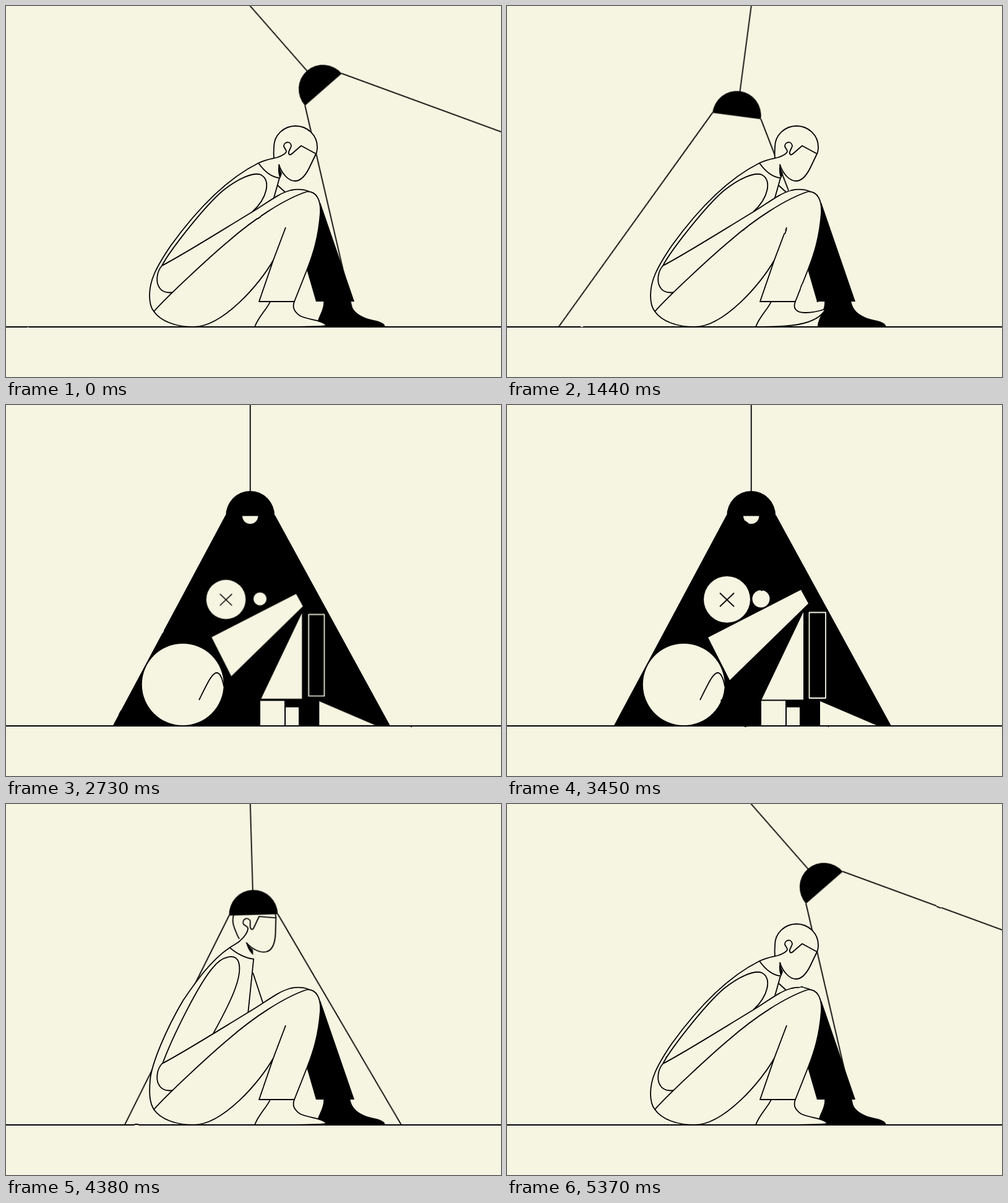
An HTML page that plays this animation: 800x600 px, repeating every 5.4 s.

```html
<!DOCTYPE html>
<html lang="en">
<head>
<meta charset="utf-8">
<title>Under the lamp</title>
<style>
  :root { --paper: #f6f5e2; --ink: #000; --loop: 5400ms; --ease: cubic-bezier(.65, 0, .35, 1); }
  html, body { margin: 0; width: 100%; height: 100%; overflow: hidden; background: var(--paper); }
  svg { display: block; width: 100vw; height: 100vh; }

  .line { fill: none; }
  .skin { fill: var(--paper); }
  .ink { fill: var(--ink); stroke: none; }
  .bare { stroke: none; }
  .outlined { fill: var(--ink); stroke: var(--paper); }

  .swing, .pose, .head, .toe { animation: var(--loop) var(--ease) infinite; }
  .swing { transform-origin: 395px 0; animation-name: swing; }
  .pose { animation-name: pose; }
  .head { transform-origin: 477px 226px; animation-name: head; }
  .toe { animation-name: toe; }
  .dark { animation: dark var(--loop) linear infinite; }
  .bulb { animation: bulb var(--loop) step-end infinite; }
  .piece {
    transform-box: fill-box;
    transform-origin: center;
    animation: pop var(--loop) var(--ease) calc(var(--i) * 20ms) infinite backwards;
  }

  @keyframes swing {
    0%, 1.1% { transform: rotate(-41.2deg); }
    29.63% { transform: rotate(8deg); }
    40.74%, 76.48% { transform: rotate(0deg); }
    100% { transform: rotate(-41.2deg); }
  }
  @keyframes pose {
    0%, 27.8% { d: var(--low); }
    40.74%, 75% { d: var(--high); }
    97.2%, 100% { d: var(--low); }
  }
  @keyframes head {
    0%, 27.8% { transform: translate(0px, 0px) rotate(0deg); }
    40.74%, 75% { transform: translate(-74.8px, -48.4px) rotate(-26.4deg); }
    97.2%, 100% { transform: translate(0px, 0px) rotate(0deg); }
  }
  @keyframes toe {
    0%, 17% { d: var(--low); }
    26%, 37% { d: var(--high); }
    46.3%, 100% { d: var(--low); }
  }
  @keyframes dark {
    0%, 39.26% { opacity: 0; }
    42.4%, 71.7% { opacity: 1; }
    74.1%, 100% { opacity: 0; }
  }
  @keyframes bulb {
    0% { opacity: 0; }
    39.26% { opacity: 1; }
    74.1%, 100% { opacity: 0; }
  }
  @keyframes pop {
    0%, 44% { transform: scale(0); }
    50%, 66.5% { transform: scale(1); }
    68.5%, 100% { transform: scale(0); }
  }

  .body {
    --low: path("M408,254 C358,279 310,327 266,388 C241,425 232,445 232,468 C232,480 234,488 239,494 L300,500 L433,340 L433,310 L442,278 C430,277 418,268 408,254 Z");
    --high: path("M357,230 C328,250 304,287 288,311 C260,359 236,417 233,444 C231,468 232,483 239,494 L300,500 L387,362 L387,341 L396,248 C384,247 367,239 357,230 Z");
  }
  .far-arm {
    --low: path("M439,290 L451,301 L433,318");
    --high: path("M395,271 L412,325 L387,348");
  }
  .neck {
    --low: path("M408,254 L433,246 L454,235 L446,270 L442,279 Z");
    --high: path("M357,230 L372,219 L386,197 L394,231 L396,248 Z");
  }
  .nape {
    --low: path("M408,254 C420,248 430,247 438,245 Q450,241 453,236");
    --high: path("M357,230 C366,224 370,222 372,219 Q385,207 385,197");
  }
  .upper-arm {
    --low: path("M252,420 C265,395 320,325 350,299 C375,279 400,268 412,273 C428,282 423,310 398,333");
    --high: path("M253,420 C270,373 311,287 333,261 C347,242 367,239 372,253 C380,278 354,327 327,378");
  }
  .foot {
    --low: path("M427,478 C422,490 408,502 402,519 C440,519 500,520 518,517 C512,508 490,508 475,501 C464,493 463,486 466,478");
    --high: path("M427,478 C422,490 408,502 402,519 C450,519 500,518 515,490 C500,495 490,496 482,496 C466,496 462,488 466,478");
  }
</style>
</head>
<body>
<svg viewBox="0 0 800 600" preserveAspectRatio="none">
  <defs>
    <clipPath id="above"><rect x="-10" y="-10" width="820" height="529"/></clipPath>
    <filter id="rough" filterUnits="userSpaceOnUse" x="-10" y="-10" width="820" height="620" color-interpolation-filters="sRGB">
      <feTurbulence id="noise" type="fractalNoise" baseFrequency=".045" numOctaves="1" seed="1"/>
      <feDisplacementMap in="SourceGraphic" scale="1.8" xChannelSelector="R" yChannelSelector="G"/>
    </filter>
  </defs>

  <g filter="url(#rough)" stroke="#000" stroke-width="1.8" stroke-linejoin="round">
    <g clip-path="url(#above)">
      <path class="swing line" d="M355.5,179 l-728,1360 M434,179 l744,1360"/>
    </g>

    <!-- far leg -->
    <path class="ink" d="M508,318 L563,478 L501,478 L486,426 Z"/>
    <path class="ink" d="M513,476 C515,492 502,505 502,519 L613,519 C612,513 605,510 590,507 C570,502 558,492 556,476 Z"/>

    <!-- torso and head -->
    <path class="pose skin far-arm"/>
    <path class="pose skin bare neck"/>
    <path class="pose skin body"/>
    <g class="head">
      <path class="skin" d="M433,246 C432,236 433,232 433,228 A35,34 0 0 1 503,228 Q503,235 501,239 L490,262 C484,274 476,283 467,283 C456,283 445,270 441,256"/>
      <path class="ink" d="M441,255 C439,264 440,273 443,279 L446,271 Q442,264 441,255 Z"/>
      <path class="line" d="M501,239 L477,226 L462,239 C459,242 456,240 457,236 C458,232 461,229 461,226 C460,218 449,219 449,227 C450,231 453,231 453,236"/>
    </g>
    <path class="pose line nape"/>
    <path class="pose line upper-arm"/>
    <path class="skin" d="M270,463 C258,465 250,461 246,452 C243,445 243,430 252,420 C290,400 350,362 398,333 C420,320 440,303 460,298 C475,295 485,298 490,300"/>

    <!-- near leg -->
    <path class="toe skin foot"/>
    <path class="skin" d="M239,494 C260,470 330,405 360,380 C400,345 450,312 487,300 C502,300 509,314 508,335 C505,375 496,402 487,425 L466,478 L409,478 L432,411 C410,450 350,519 303,519 C275,519 250,510 239,494 Z"/>
    <path class="line" d="M452,358 L432,411"/>

    <!-- lamp -->
    <path class="ink dark" d="M355,178 H434.5 L620.5,519 H173 Z"/>
    <g class="swing">
      <path class="line" d="M394.7,-10 V142"/>
      <path class="ink" d="M355.2,179.5 A39.5,40.5 0 0 1 434.2,179.5 Z"/>
      <path class="bulb skin bare" d="M382,179.5 A12.7,12.7 0 0 0 407.4,179.5 Z"/>
    </g>

    <!-- shapes in the light -->
    <g class="skin">
      <g class="piece" style="--i:0">
        <circle class="bare" cx="285.7" cy="452" r="66"/>
        <path class="line" d="M312,477 C326,449 333,433 341,433 C347,434 350,444 352,455"/>
      </g>
      <path class="piece bare" style="--i:1" d="M411,478.5 H450 V518 H411 Z"/>
      <path class="piece bare" style="--i:2" d="M452,489 H473 V518 H452 Z"/>
      <path class="piece bare" style="--i:3" d="M506,479 V518 H597 Z"/>
      <path class="piece bare" style="--i:4" d="M479,335 V476.5 H411.5 Z"/>
      <path class="piece outlined" style="--i:5" d="M488.5,335.5 H515 V474 H488.5 Z"/>
      <path class="piece bare" style="--i:6" d="M325,376 L475,299 L487,321 L360,445 Z"/>
      <g class="piece" style="--i:7">
        <circle class="bare" cx="355.5" cy="314.5" r="37.5"/>
        <path class="line" d="M344,304 L367,326 M367,304 L344,326"/>
      </g>
      <circle class="piece bare" style="--i:8" cx="410.5" cy="313.5" r="14"/>
    </g>

    <path class="line" d="M-10,519 H810"/>
  </g>
</svg>
<script>
  // Reseed the noise so the ink lines shiver.
  const noise = document.getElementById("noise");
  let last = -1;
  function boil(now) {
    const seed = 1 + Math.floor((now % 5400) / 90);
    if (seed !== last) noise.setAttribute("seed", last = seed);
    requestAnimationFrame(boil);
  }
  requestAnimationFrame(boil);
</script>
</body>
</html>
```
